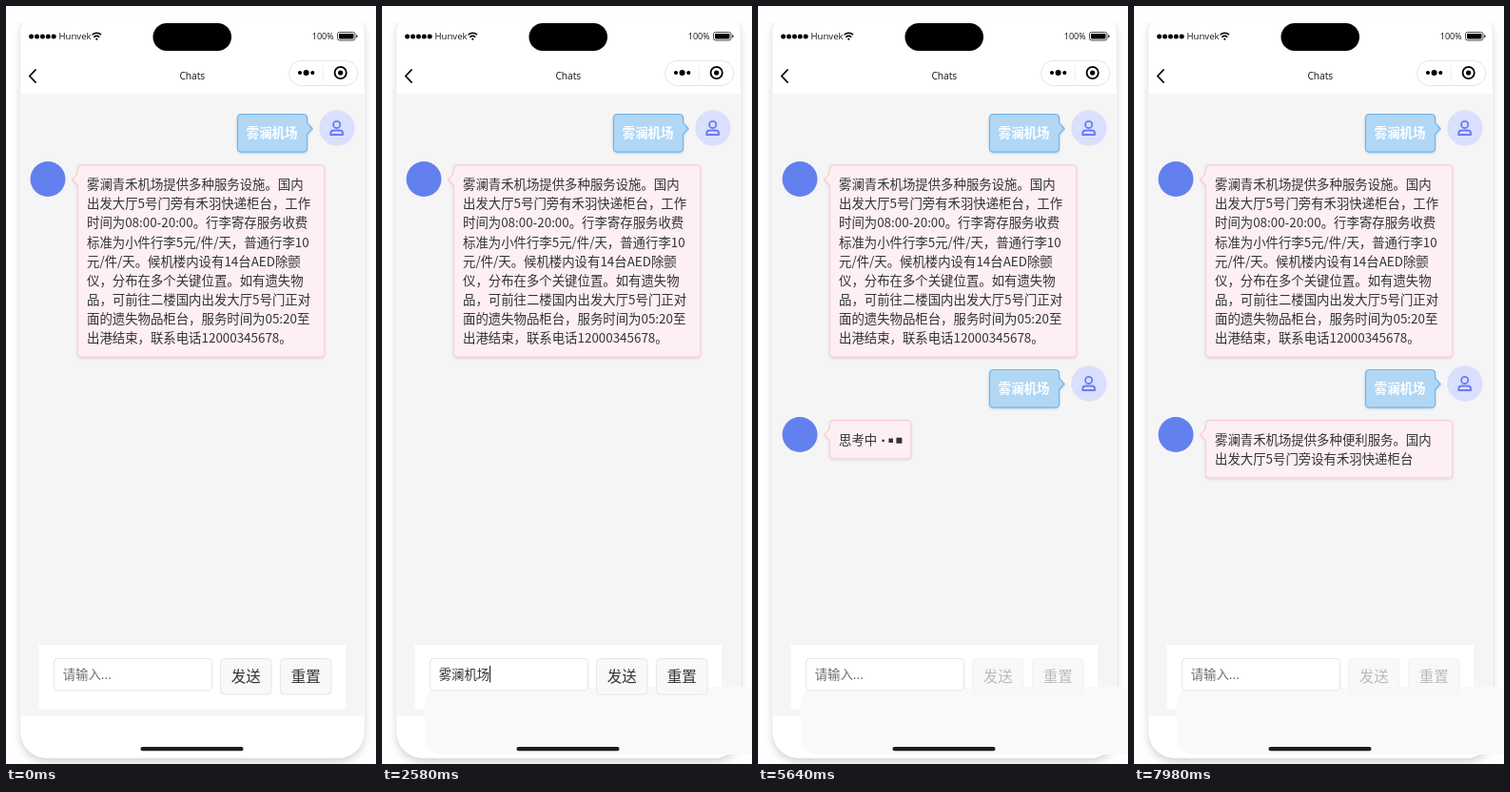
These frames come from a looping animation (389x795 px, 8 s). An HTML page:

```html
<!DOCTYPE html>
<html lang="zh-CN">
<head>
<meta charset="utf-8">
<title>Chat</title>
<style>
  html, body { margin: 0; width: 100%; height: 100%; overflow: hidden; background: #fefefe; }
  svg { display: block; width: 389px; height: 795px; }
  text { font-family: "Noto Sans CJK SC", "Noto Sans CJK", sans-serif; font-size: 13.4px; fill: #333; white-space: pre; }
  .ui { font-family: "Open Sans", "Noto Sans", sans-serif; fill: #111; }
  .sent { fill: #fff; font-weight: 700; }
  .btn { font-size: 15.5px; }
  .cand { font-size: 18.5px; fill: #222; }
  .num { font-family: "Open Sans", sans-serif; font-size: 17px; fill: #555; }
</style>
</head>
<body>
<svg viewBox="0 0 389 795" xmlns="http://www.w3.org/2000/svg">
  <defs>
    <filter id="phoneShadow" x="-10%" y="-5%" width="120%" height="110%">
      <feDropShadow dx="0" dy="4" stdDeviation="4" flood-color="#000" flood-opacity=".17"/>
    </filter>
    <filter id="soft" x="-20%" y="-30%" width="140%" height="170%">
      <feDropShadow dx="0" dy="1" stdDeviation="1.3" flood-color="#000" flood-opacity=".14"/>
    </filter>
    <filter id="popShadow" x="-10%" y="-40%" width="120%" height="200%">
      <feDropShadow dx="0" dy="4" stdDeviation="4" flood-color="#000" flood-opacity=".2"/>
    </filter>
  </defs>

  <rect x="15.5" y="2" width="361" height="787" rx="28" fill="#fff" filter="url(#phoneShadow)"/>
  <rect x="0" y="0" width="389" height="17" fill="#fefefe"/>
  <rect x="16" y="92" width="360" height="652.5" fill="#f5f5f5"/>

  <!-- status bar -->
  <g id="signal" fill="#000"></g>
  <text class="ui" x="55.5" y="35.3" style="font-size:9.6px">Hunvek</text>
  <g fill="none" stroke="#000" stroke-width="1.5">
    <path d="M90.5 30.3Q95.3 26.1 100.1 30.3M92.4 32.6Q95.3 30.1 98.2 32.6"/>
    <circle cx="95.3" cy="34.8" r=".7" fill="#000" stroke-width=".8"/>
  </g>
  <rect x="154.5" y="18" width="82.5" height="29" rx="14.5" fill="#000"/>
  <text class="ui" x="321.8" y="35.2" style="font-size:9px">100%</text>
  <rect x="348.5" y="27.5" width="18.5" height="8.5" rx="2.2" fill="none" stroke="#333" stroke-width=".9"/>
  <rect x="350" y="29" width="15.5" height="5.5" rx="1" fill="#000"/>
  <path d="M368.2 30v3.5q1.5-.4 1.5-1.75t-1.5-1.75" fill="#333"/>

  <!-- title bar -->
  <path d="M31 67L24.8 73.5L31 80" fill="none" stroke="#000" stroke-width="1.8" stroke-linecap="round" stroke-linejoin="round"/>
  <text class="ui" x="195.8" y="77" text-anchor="middle" style="font-size:10.2px">Chats</text>
  <rect x="297.5" y="57.5" width="72.5" height="26" rx="13" fill="#fff" stroke="#e4e4e4"/>
  <path d="M333.5 62.5v16" stroke="#f0f0f0"/>
  <circle cx="309" cy="70" r="2.1"/><circle cx="315.6" cy="70" r="3"/><circle cx="322.3" cy="70" r="2.1"/>
  <circle cx="351.7" cy="70" r="6.1" fill="none" stroke="#000" stroke-width="1.8"/>
  <circle cx="351.7" cy="70" r="2.6"/>

  <g id="history"></g>
  <g id="turn">
    <g id="avatars"></g>
    <g id="asked"></g>
    <g id="reply"></g>
  </g>

  <!-- input panel -->
  <rect x="34.5" y="670" width="322.5" height="67.5" fill="#fff"/>
  <rect id="veil" x="45" y="714" width="360" height="71" rx="18" fill="#f9f9f9"/>
  <rect x="50.5" y="684.5" width="166" height="33.5" rx="3.5" fill="#fff" stroke="#e6e6e6"/>
  <text id="field" x="59.7" y="706.2"></text>
  <path id="underline" stroke="#555" stroke-width=".8"/>
  <path id="caret" stroke="#222" stroke-width="1.1"/>
  <g id="buttons"></g>
  <rect x="141.5" y="777" width="108" height="4.3" rx="2.1" fill="#1c1c1c"/>
  <g id="popup"></g>
</svg>

<script>
const LOOP = 8000, TICK = 60, EM = 13.4, LINE = 20.15;
const CITY = '雾澜', PLACE = CITY + '机场', FULL = CITY + '青禾机场';
const TURN_Y = 268;

const $ = id => document.getElementById(id);
const clamp = v => Math.max(0, Math.min(1, v));
const easeOut = p => 1 - Math.pow(1 - p, 1.6);
const show = (node, on) => node.setAttribute('visibility', on ? 'visible' : 'hidden');
const text = (x, y, s, cls = '', extra = '') =>
  `<text x="${x}" y="${y}" class="${cls}" ${extra}>${s}</text>`;
const rect = (x, y, w, h, r, fill, extra = '') =>
  `<rect x="${x}" y="${y}" width="${w}" height="${h}" rx="${r}" fill="${fill}" ${extra}/>`;

// Rounded bubble with a small pointer on one side
function bubble(x, y, w, h, side, fill, stroke) {
  const r = 4.5, right = x + w, low = y + h;
  const tipR = side > 0 ? `V${y + 9}l5.5 6l-5.5 6` : '';
  const tipL = side < 0 ? `V${y + 21}l-5.5 -6l5.5 -6` : '';
  return `<path d="M${x + r} ${y}H${right - r}q${r} 0 ${r} ${r}${tipR}V${low - r}q0 ${r} ${-r} ${r}` +
    `H${x + r}q${-r} 0 ${-r} ${-r}${tipL}V${y + r}q0 ${-r} ${r} ${-r}Z" fill="${fill}" stroke="${stroke}" ` +
    `stroke-width="1.2" filter="url(#soft)"/>`;
}

function avatars(dy) {
  const y = 128 + dy;
  return `<circle cx="348" cy="${y}" r="18.7" fill="#d9dffd"/>
    <g fill="none" stroke="#6a7af4" stroke-width="1.8" stroke-linejoin="round">
      <circle cx="347.7" cy="${y - 3.6}" r="3.6"/>
      <path d="M341.3 ${y + 7}v-1.3q0-3.2 3.2-3.2h6.4q3.2 0 3.2 3.2v1.3z"/>
    </g>
    <circle cx="44" cy="${181.5 + dy}" r="18.5" fill="#6381ee"/>`;
}

const question = dy =>
  bubble(243.4, 113.5 + dy, 73.2, 39.7, 1, '#b1d7f5', '#6cb5f1') + text(252.8, 138.2 + dy, PLACE, 'sent');

function answer(y, lines, w) {
  return bubble(75.3, y, w, lines.length * LINE + 20, -1, '#fdeff3', '#fbced8') +
    lines.map((s, i) => text(85, y + 25.3 + i * LINE, s)).join('');
}

$('signal').innerHTML = [0, 1, 2, 3, 4]
  .map(i => `<circle cx="${26.6 + i * 5.9}" cy="32" r="2.5"/>`).join('');

$('history').innerHTML = avatars(0) + question(0) + answer(166.8, [
  FULL + '提供多种服务设施。国内',
  '出发大厅5号门旁有禾羽快递柜台，工作',
  '时间为08:00-20:00。行李寄存服务收费',
  '标准为小件行李5元/件/天，普通行李10',
  '元/件/天。候机楼内设有14台AED除颤',
  '仪，分布在多个关键位置。如有遗失物',
  '品，可前往二楼国内出发大厅5号门正对',
  '面的遗失物品柜台，服务时间为05:20至',
  '出港结束，联系电话12000345678。'
], 259.5);
$('avatars').innerHTML = avatars(TURN_Y);
$('asked').innerHTML = question(TURN_Y);

// Streamed reply: [time, piece]
const stream = [[5820, CITY], [5940, '青'], [6180, '禾'], [6300, '机场']];
['提供', '多种', '便利', '服务', '。', '国内', '出发', '大厅', '5']
  .forEach((s, i) => stream.push([6360 + i * 90, s]));
stream.push([7200, '号']);
['门', '旁', '设有', '禾羽', '快递', '柜', '台']
  .forEach((s, i) => stream.push([7380 + i * 100, s]));

// Composition stages: [time, keys, candidates]
const stages = [
  [1380, 'w', ['我', '为', '五', '玩']],
  [1740, "w'l", ['网络', '未来', '物流']],
  [2040, "w'l'j", [CITY, '网络', '未来']],
  [2220, "w'l'j'c", [PLACE, '网络教程']]
];
const COMMIT = 2580, SEND = 3720;

function drawReply(t) {
  const y = 434.6;
  const said = stream.filter(s => t >= s[0]).map(s => s[1]).join('');
  if (said) {
    const lines = [said.slice(0, 17), said.slice(17)].filter(Boolean);
    const w = lines.length > 1 ? 259.5 : said.length * EM + 20;
    return answer(y, lines, w);
  }
  const dots = [131.6, 139.7, 148.4].map((x, i) => {
    const size = 4 + 2 * Math.cos(2 * Math.PI * ((t - 3840) / 780 + .1 - i * .2));
    return rect(x - size / 2, y + 21.2 - size / 2, size, size, .3, '#333');
  });
  return answer(y, ['思考中'], 85.5) + dots.join('');
}

function drawTurn(t) {
  show($('turn'), t >= SEND);
  if (t < SEND) return;
  const p = easeOut(clamp((t - 3690) / 300));
  $('reply').innerHTML = drawReply(t);
  for (const id of ['asked', 'reply']) {
    $(id).setAttribute('opacity', p);
    $(id).setAttribute('transform', `translate(0 ${5 * (1 - p)})`);
  }
}

function drawPopup(t, stage) {
  const open = stage && t < COMMIT;
  show($('popup'), open);
  if (!open) return;
  const list = stage[2];
  let x = 80, out = rect(58.5, 718.5, 400, 44.5, 7, '#f8f8f8', 'filter="url(#popShadow)"') +
    rect(65, 725, 59.5 + 18.5 * list[0].length, 33, 5, '#eeeeee') +
    rect(65, 731, 4, 19.5, 2, '#7d5238');
  list.forEach((s, i) => {
    out += text(x, 748.5, i + 1, 'num') + text(x + 14.5, 748.7, s, 'cand');
    x += 64.3 + 18.5 * s.length;
  });
  $('popup').innerHTML = out;
  $('popup').setAttribute('opacity', clamp((t - 1320) / 180));
}

function drawField(t, stage) {
  const field = $('field');
  const typed = t >= SEND ? '' : t >= COMMIT ? PLACE : stage ? stage[1] : '';
  field.textContent = typed || '请输入...';
  field.style.fill = typed ? '#333' : '#6e6e6e';
  const end = 60 + (typed ? field.getComputedTextLength() : 0);
  const composing = typed && t < COMMIT;
  $('underline').setAttribute('d', composing ? `M60 709H${end}` : '');
  const caretX = end + (composing ? 1 : 0);
  $('caret').setAttribute('d', `M${caretX} 692V709.5`);
  show($('caret'), t >= 900 && t < SEND && !(t >= 3060 && t < 3540));
}

function drawButtons(t) {
  const off = t >= SEND, pressed = t >= 3420 && !off;
  const line = t >= 5400 ? '#f2f2f2' : '#e7e7e7';
  const ink = off ? 'fill:#bcbcbc' : 'fill:#333;font-weight:500';
  $('buttons').innerHTML = [[226, '发送', pressed], [289, '重置', false]].map(([x, s, down]) =>
    rect(x - .5, 684.5, 53.5, 37.5, 4, down ? '#eeeeee' : '#f8f8f8', `stroke="${line}"`) +
    text(x + 10.8, 708.8, s, 'btn', `style="${ink}"`)).join('');
}

function draw(t) {
  const stage = stages.filter(s => t >= s[0]).pop();
  show($('veil'), t >= 1380);
  drawTurn(t);
  drawField(t, stage);
  drawButtons(t);
  drawPopup(t, stage);
}

const start = performance.now();
let last = -1;
function frame() {
  const t = Math.floor((performance.now() - start) % LOOP / TICK) * TICK;
  if (t !== last) draw(last = t);
  requestAnimationFrame(frame);
}
frame();
</script>
</body>
</html>
```
